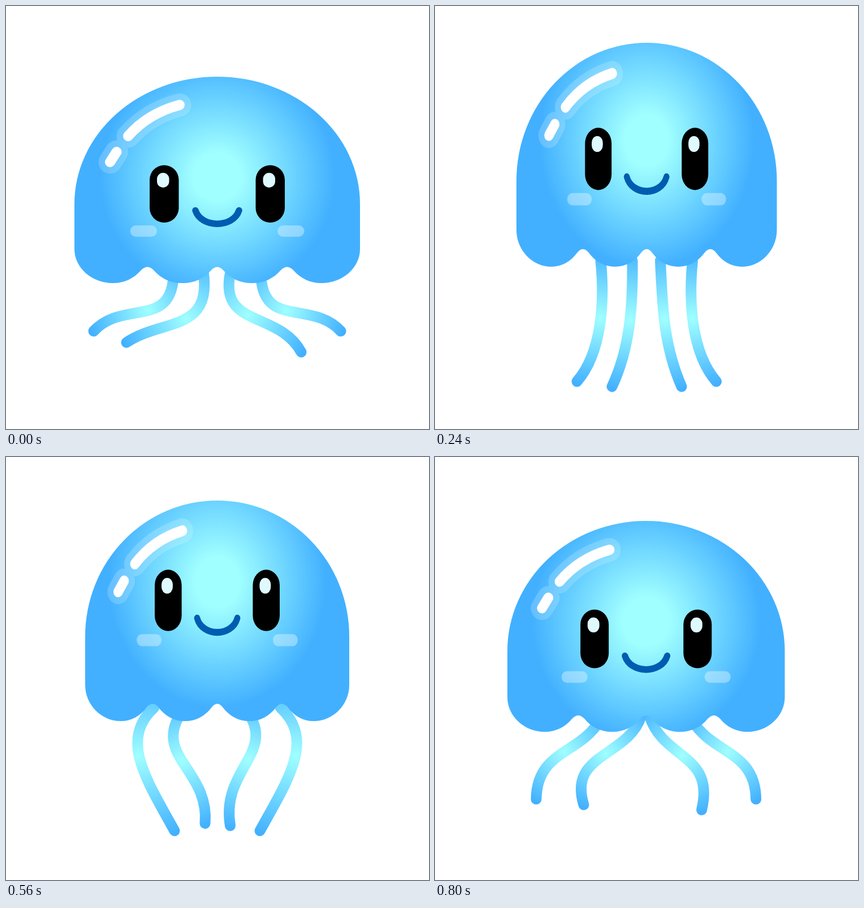
These frames come from a looping animation (748x748 px, 880 ms). An HTML page with a canvas:

```html
<!DOCTYPE html>
<html lang="en">
<head>
<meta charset="utf-8">
<title>Jellyfish</title>
<style>
  html, body { margin: 0; width: 100%; height: 100%; overflow: hidden; background: #fff; }
  canvas { display: block; width: 748px; height: 748px; }
</style>
</head>
<body>
<canvas id="stage" width="748" height="748"></canvas>
<script>
const ctx = document.getElementById('stage').getContext('2d');
const STEP = 80, STEPS = 11;
const GLOW = '#a0ffff', BLUE = '#42b0ff';

// Key poses, at these steps of the loop
const keySteps = [0, 1, 3, 5, 7, 8, 10];

// left, right, top, bottom, vertical shift of the face
const bell = [
  [121, 626, 125, 490, 0],
  [130.5, 616, 103, 481, 8],
  [144, 604.5, 65, 461, -18],
  [149.5, 597.5, 61.5, 468, -30],
  [140, 607, 77, 467, -42],
  [138.5, 610, 90, 475, -30],
  [128, 618.5, 113, 486, -3],
];

// Each tentacle is one cubic Bézier curve, root to tip
const outer = [
  [296, 478, 292, 570, 205, 520, 155, 575],
  [293, 470, 285, 535, 240, 600, 169, 598],
  [293, 450, 300, 520, 296, 612, 251, 664],
  [280, 440, 280, 520, 279, 590, 286.5, 677],
  [262, 443, 200, 500, 248, 570, 298, 661],
  [264, 450, 205, 510, 205, 555, 250, 648],
  [290, 468, 255, 525, 180, 520, 179, 605],
];
const innerLeft = [
  [349, 470, 365, 577, 275, 553, 213, 595],
  [354, 460, 354, 540, 325, 605, 240, 627],
  [349, 450, 350, 530, 345, 605, 313, 673],
  [341, 455, 333, 520, 333, 610, 343.5, 670],
  [308, 455, 262, 530, 360, 555, 352, 648],
  [322, 465, 270, 520, 296, 565, 334, 641],
  [364, 460, 340, 530, 235, 525, 263, 615],
];
const innerRight = [
  [397, 470, 375, 570, 482, 538, 522, 612],
  [397, 460, 398, 530, 425, 605, 491, 634],
  [398.5, 450, 402, 530, 404, 600, 436, 673],
  [393, 445, 419, 525, 418, 585, 405, 672],
  [430, 455, 474, 525, 380, 555, 396.5, 652],
  [415, 463, 470, 520, 453, 565, 409.5, 645],
  [380, 460, 405, 535, 495, 525, 471.5, 624],
];

// Smooth periodic interpolation between key poses
function poseAt(poses, step) {
  const n = poses.length;
  const key = i => poses[(i + n) % n];
  const time = i => keySteps[(i + n) % n] + STEPS * Math.floor(i / n);
  let i = n - 1;
  while (keySteps[i] > step) i--;
  const span = time(i + 1) - time(i), u = (step - time(i)) / span;
  const slope = (j, k) => 0.75 * (key(j + 1)[k] - key(j - 1)[k]) / (time(j + 1) - time(j - 1));
  return key(i).map((a, k) => {
    const b = key(i + 1)[k], ease = u * u * (3 - 2 * u);
    return a + (b - a) * ease
      + span * u * (1 - u) * ((1 - u) * slope(i, k) - u * slope(i + 1, k));
  });
}

function radial(x, y, r, core) {
  const g = ctx.createRadialGradient(x, y, 0, x, y, r);
  g.addColorStop(core, GLOW);
  g.addColorStop(1, BLUE);
  return g;
}

function stroke(path, color, width) {
  ctx.strokeStyle = color;
  ctx.lineWidth = width;
  ctx.stroke(path);
}

function pill(x, y, w, h, color) {
  ctx.fillStyle = color;
  ctx.beginPath();
  ctx.roundRect(x, y, w, h, Math.min(w, h) / 2);
  ctx.fill();
}

function tentacle([x0, y0, x1, y1, x2, y2, x3, y3]) {
  const t = 0.45, s = 1 - t;
  const along = (a, b, c, d) => s * s * s * a + 3 * s * s * t * b + 3 * s * t * t * c + t * t * t * d;
  const x = along(x0, x1, x2, x3), y = along(y0, y1, y2, y3);
  const path = new Path2D();
  path.moveTo(x0, y0);
  path.bezierCurveTo(x1, y1, x2, y2, x3, y3);
  stroke(path, radial(x, y, Math.hypot(x3 - x, y3 - y) + 5, 0), 19);
}

const bellPath = new Path2D(`M121 350 A252.5 225 0 0 1 626 350 V430
  C626 463 595 490 558 490 C538 490 521 482 508 467
  Q497 456 486 467 C473 482 456 490 435 490 C414 490 397 482 384 467
  Q373.5 456 363 467 C350 482 333 490 312 490 C291 490 274 482 261 467
  Q250 456 239 467 C226 482 209 490 189 490 C152 490 121 463 121 430 Z`);
const shine = new Path2D('M307 175 Q251 190 216 230 M195.500 258 L184 276');
const smile = new Path2D('M335 361.500 C345 393 402 393 412 361.500');

function draw(step) {
  ctx.setTransform(1, 0, 0, 1, 0, 0);
  ctx.fillStyle = '#fff';
  ctx.fillRect(0, 0, 748, 748);
  ctx.lineCap = 'round';

  const [left, right, top, bottom, face] = poseAt(bell, step);
  const side = poseAt(outer, step);
  tentacle(side);
  tentacle(side.map((v, i) => i % 2 ? v : left + right - v));
  tentacle(poseAt(innerLeft, step));
  tentacle(poseAt(innerRight, step));

  ctx.translate((left + right) / 2, top);
  ctx.scale((right - left) / 505, (bottom - top) / 365);
  ctx.translate(-373.5, -125);
  ctx.fillStyle = radial(373.5, 302 + face, 208, 0.2);
  ctx.fill(bellPath);
  stroke(shine, 'rgba(255,255,255,.18)', 41);
  stroke(shine, '#fff', 18);

  ctx.translate(0, face);
  for (const x of [254, 441.5]) {
    pill(x, 281.5, 51.5, 101.5, '#000');
    pill(x + 13, 295, 21.5, 26, '#dffaff');
  }
  for (const x of [219.5, 480]) pill(x, 388, 47.5, 20, 'rgba(255,255,255,.35)');
  stroke(smile, '#005cb0', 11.5);
}

function tick() {
  draw(Math.floor(performance.now() / STEP) % STEPS);
  requestAnimationFrame(tick);
}
tick();
</script>
</body>
</html>
```
